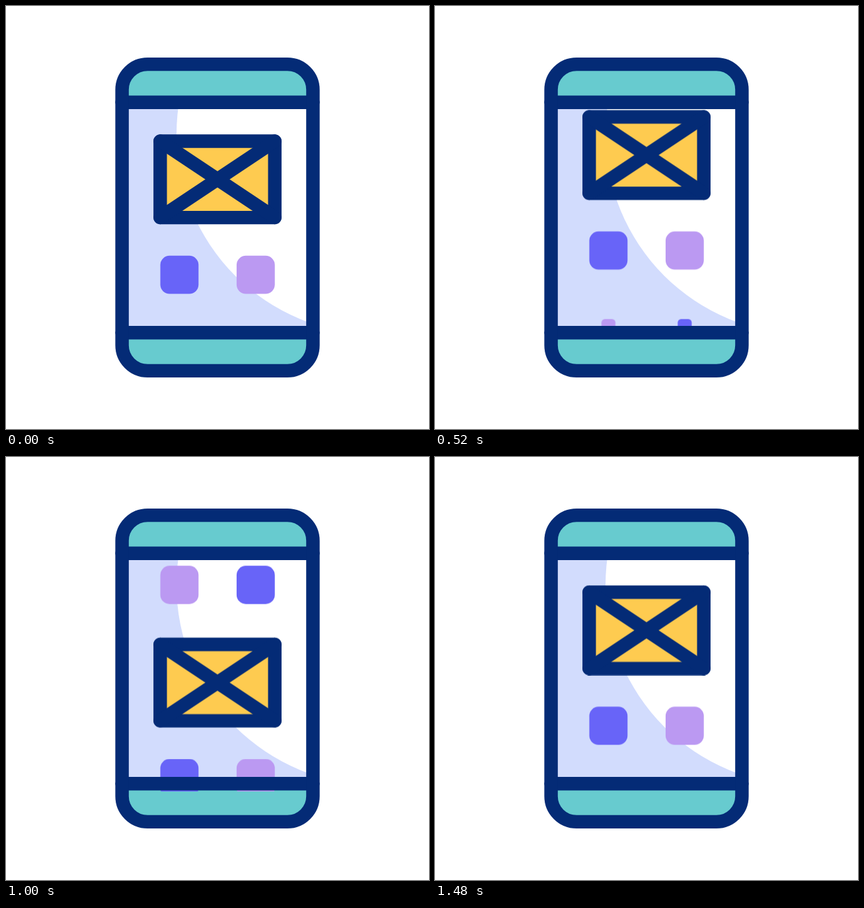
An HTML page that plays this animation: 640 px wide and 640 px high, repeating every 2 s.

```html
<!DOCTYPE html>
<html lang="en">
<head>
<meta charset="utf-8">
<title>Scrolling phone</title>
<style>
  html, body { margin: 0; width: 100%; height: 100%; overflow: hidden; background: #fff; }
  svg { display: block; width: 100%; height: 100%; }
  .line { fill: none; stroke: #042b76; stroke-width: 20.4; stroke-linecap: round; stroke-linejoin: round; }
  .teal { fill: #67cbcf; }
  .pop { transform-box: fill-box; transform-origin: center; }
</style>
</head>
<body>
<svg viewBox="0 0 640 640">
  <defs>
    <clipPath id="screen"><rect x="180" y="146" width="280" height="348"/></clipPath>
    <clipPath id="window"><rect x="180" y="146" width="280" height="359.2"/></clipPath>
  </defs>
  <rect class="teal" x="175.6" y="88.1" width="288.8" height="463.8" rx="38.6"/>
  <g clip-path="url(#screen)">
    <rect x="180" y="146" width="280" height="348" fill="#d2dcfd"/>
    <circle cx="560.5" cy="194" r="302.5" fill="#fff"/>
  </g>
  <g clip-path="url(#window)"><g id="feed"></g></g>
  <path class="line" d="M175.6 145.8H464.4M175.6 494.3H464.4"/>
  <rect class="line" x="175.6" y="88.1" width="288.8" height="463.8" rx="38.6"/>
</svg>
<script>
  const LOOP = 2000, STEP = 40, TRAVEL = 406.5;
  const BLUE = '#6864f8', LILAC = '#bb99f2';
  const feed = document.getElementById('feed');

  function add(tag, attrs, parent) {
    const el = document.createElementNS('http://www.w3.org/2000/svg', tag);
    for (const key in attrs) el.setAttribute(key, attrs[key]);
    return parent.appendChild(el);
  }

  // Symmetric cubic-bezier(.64, 0, .36, 1), solved by bisection.
  function ease(x) {
    if (x <= 0) return 0;
    if (x >= 1) return 1;
    const a = 0.64;
    let lo = 0, hi = 1, t = 0.5;
    for (let i = 0; i < 30; i++) {
      t = (lo + hi) / 2;
      const u = 1 - t;
      const bx = 3 * u * u * t * a + 3 * u * t * t * (1 - a) + t * t * t;
      if (bx < x) lo = t; else hi = t;
    }
    return t * t * (3 - 2 * t);
  }

  // Runs a transform at 25 steps per second.
  function play(el, start, duration, transform) {
    const frames = [];
    for (let time = 0; time <= LOOP; time += STEP) {
      frames.push({
        offset: time / LOOP,
        transform: transform(ease((time - start) / duration)),
        easing: 'step-end'
      });
    }
    el.animate(frames, { duration: LOOP, iterations: Infinity });
  }

  function pop(el, start) {
    if (start === undefined) return;
    el.setAttribute('class', 'pop');
    play(el, start, 400, p => `scale(${p.toFixed(4)})`);
  }

  function envelope(y, start) {
    const g = add('g', {}, feed);
    const box = { x: 233.3, y: y - 57.8, width: 173.4, height: 115.6 };
    add('rect', { ...box, fill: '#fecb50' }, g);
    add('rect', { ...box, class: 'line' }, g);
    add('path', { class: 'line', d: `M233.3 ${y - 57.8}l173.4 115.6m0 -115.6l-173.4 115.6` }, g);
    pop(g, start);
  }

  function row(y, colors, start) {
    colors.forEach((fill, i) => {
      const x = 233.5 + i * 115.4;
      pop(add('rect', { x, y: y - 28.9, width: 57.8, height: 57.8, rx: 14, fill }, feed), start);
    });
  }

  envelope(262.3);
  row(406.7, [BLUE, LILAC]);
  row(521, [LILAC, BLUE], 340);
  envelope(262.3 + TRAVEL, 500);
  row(406.7 + TRAVEL, [BLUE, LILAC], 600);

  play(feed, 160, 1320, p => `translateY(${(-TRAVEL * p).toFixed(3)}px)`);
</script>
</body>
</html>
```
